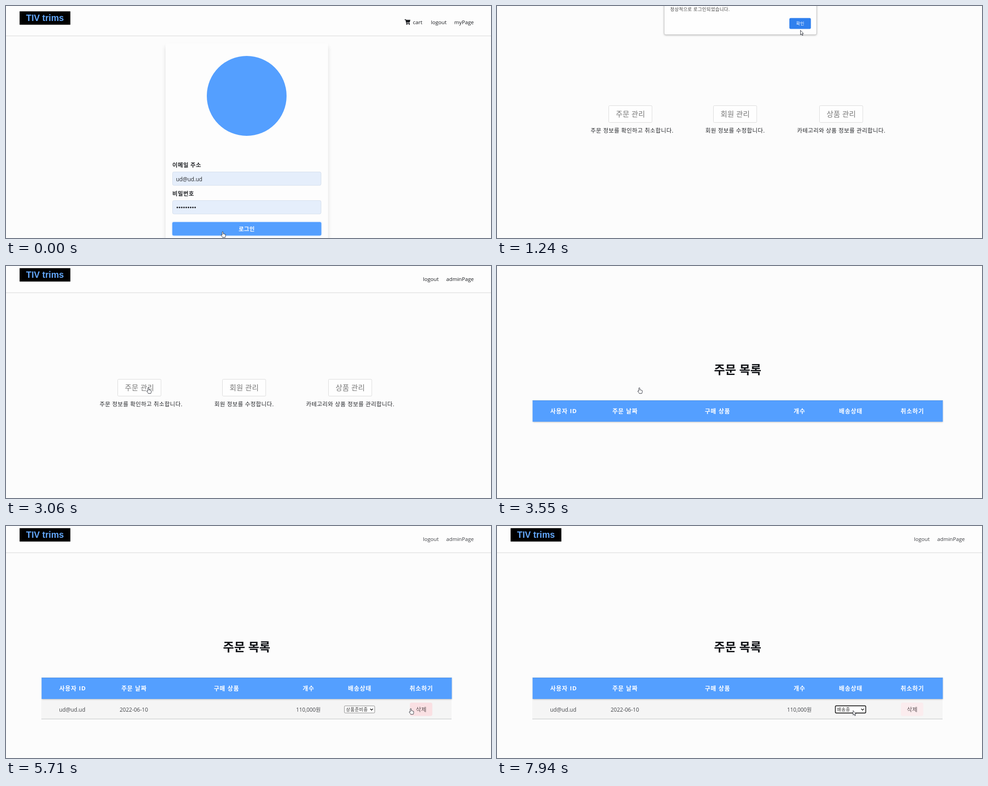
An HTML page with a canvas for the animation above (8 s loop, 1070 px wide and 511 px high).

```html
<!DOCTYPE html>
<html lang="ko">
<head>
<meta charset="utf-8">
<title>Shop admin</title>
<style>
html, body { margin: 0; width: 100%; height: 100%; overflow: hidden; background: #fcfcfc; }
canvas { display: block; width: 1070px; height: 511px; }
</style>
</head>
<body>
<canvas id="stage"></canvas>
<script>
const W = 1070, H = 511, LOOP = 8000, STEP = LOOP / 115;
const BLUE = '#549fff', INK = '#24262a';
const FONT = '"Open Sans", "Noto Sans CJK KR", "Noto Sans CJK", sans-serif';
const MAIL = 'ud@ud.ud';

// moments of the hard changes, ms
const ALERT_IN = 610, ADMIN = 950, ALERT_OUT = 1440, ADMIN_READY = 1540;
const ORDERS = 3470, ORDERS_READY = 3750, MENU_IN = 6400, MENU_OUT = 7300;

// cursor stops: time, x, y
const PATH = [
  [0, 478, 497], [250, 478, 497], [950, 655, 80], [1150, 669, 53],
  [1260, 669, 53], [1360, 668, 42], [1520, 668, 42], [2150, 345, 322],
  [2330, 330, 335], [2380, 330, 335], [2500, 328, 325], [3050, 314, 268],
  [3620, 314, 268], [4280, 290, 379], [4450, 290, 379], [4950, 760, 422],
  [5450, 893, 402], [5780, 893, 402], [6300, 788, 404], [6600, 788, 404],
  [7100, 786, 445], [7600, 786, 445], [7860, 785, 406], [8000, 785, 406]
];

const canvas = document.getElementById('stage');
const dpr = window.devicePixelRatio || 1;
canvas.width = W * dpr;
canvas.height = H * dpr;
const c = canvas.getContext('2d');

function text(str, x, y, size, { color = INK, weight = 400, align = 'center', gap = 0, font = FONT } = {}) {
  c.font = `${weight} ${size}px ${font}`;
  c.letterSpacing = gap + 'px';
  c.textAlign = align;
  c.fillStyle = color;
  c.fillText(str, x, y + size * 0.37);
}

function box(x, y, w, h, { r = 0, fill, line, width = 1, shadow } = {}) {
  c.save();
  c.beginPath();
  c.roundRect(x, y, w, h, r);
  if (shadow) {
    c.shadowColor = shadow[0];
    c.shadowBlur = shadow[1] * dpr;
    c.shadowOffsetY = shadow[2] * dpr;
  }
  if (fill) { c.fillStyle = fill; c.fill(); }
  c.shadowColor = 'transparent';
  if (line) { c.strokeStyle = line; c.lineWidth = width; c.stroke(); }
  c.restore();
}

const inside = (p, x, y, w, h) => p.x >= x && p.x <= x + w && p.y >= y && p.y <= y + h;

function cursorAt(t) {
  let i = 1;
  while (i < PATH.length - 1 && PATH[i][0] < t) i++;
  const [t0, x0, y0] = PATH[i - 1], [t1, x1, y1] = PATH[i];
  const k = Math.min(1, (t - t0) / (t1 - t0));
  const e = k * k * (3 - 2 * k);
  return { x: x0 + (x1 - x0) * e, y: y0 + (y1 - y0) * e };
}

function shape(path, x, y) {
  c.save();
  c.translate(x, y);
  const p = new Path2D(path);
  c.fillStyle = '#fff';
  c.fill(p);
  c.strokeStyle = '#30333c';
  c.lineWidth = 1;
  c.lineJoin = 'round';
  c.stroke(p);
  c.restore();
}

const ARROW = 'M0.5 0.5V10.5L2.8 8.4L4.5 12L6 11.3L4.4 7.8H7.2Z';
const HAND = 'M-1.2 8V1.3Q-1.2 0.2 0 0.2T1.2 1.3V5Q2.4 4.2 3 5.3Q4.2 4.7 4.8 5.8' +
  'Q6.4 5.5 6.4 7V9.5Q6.4 11 5.4 12.8H0Q-1 11-3.4 8.4Q-3.6 6.8-2.3 7.1Z';

function cart(x, y) {
  c.fillStyle = '#15171b';
  c.strokeStyle = '#15171b';
  c.lineWidth = 1.4;
  c.stroke(new Path2D(`M${x} ${y + 1}h2.3l1.9 7.8h6.8`));
  c.fill(new Path2D(`M${x + 2.6} ${y + 1.5}h10l-1.4 5.5h-7.4z`));
  for (const dx of [5, 10]) {
    c.beginPath();
    c.arc(x + dx, y + 11, 1.4, 0, 7);
    c.fill();
  }
}

function header(dy, links, color = '#16181c') {
  box(0, 0, W, 58.5 + dy, { fill: '#fdfdfd' });
  box(0, 58 + dy, W, 1.6, { fill: '#e2e2e2' });
  box(30, 4.8 + dy, 112, 29.4, { fill: '#000' });
  text('TIV trims', 86, 19 + dy, 19.5, { color: '#64a8fb', weight: 700, font: '"Liberation Sans", Arial, sans-serif' });
  for (const [label, right] of links) {
    text(label, right, 29 + dy, 11.6, { align: 'right', color });
  }
}

const ADMIN_LINKS = [['logout', 954.5], ['adminPage', 1032]];

function login() {
  header(7, [['cart', 918.5], ['logout', 972], ['myPage', 1032]]);
  cart(879.5, 29);
  box(352, 82, 358.5, 480, { r: 3, fill: '#fdfdfd', shadow: ['rgba(0,0,0,.13)', 10, 7] });
  c.fillStyle = BLUE;
  c.beginPath();
  c.arc(531, 198, 88, 0, 7);
  c.fill();
  const label = { weight: 700, align: 'left', gap: 0.5 };
  text('이메일 주소', 367, 350, 12.5, label);
  text('비밀번호', 367, 413, 12.5, label);
  for (const y of [365.5, 428.5]) {
    box(367.5, y, 327.5, 29.5, { r: 3, fill: '#e5eefb', line: '#d3deec' });
  }
  text(MAIL, 375, 381.5, 12, { align: 'left' });
  c.fillStyle = '#1d1f24';
  for (let i = 0; i < 9; i++) {
    c.beginPath();
    c.arc(378 + i * 4.9, 443.7, 1.7, 0, 7);
    c.fill();
  }
  box(367, 476, 328.5, 29.5, { r: 3, fill: BLUE, shadow: ['rgba(84,159,255,.7)', 3, 0] });
  text('로그인', 531, 491, 12.5, { color: '#fff', weight: 700, gap: 0.4 });
}

const CARDS = [
  [294, '주문 관리', '주문 정보를 확인하고 취소합니다.', 298],
  [525, '회원 관리', '회원 정보를 수정합니다.', 525.5],
  [759, '상품 관리', '카테고리와 상품 정보를 관리합니다.', 759.5]
];

function admin(ready) {
  const y = ready ? 249.5 : 219.5;
  if (ready) header(0, ADMIN_LINKS);
  for (const [x, title, note, nx] of CARDS) {
    box(x - 47.5, y, 95.5, 37, { r: 2, fill: '#fefefe', line: '#dadada' });
    text(title, x + 0.5, y + 19, 16, { color: '#777', gap: 0.3 });
    text(note, nx, y + 55, 12.5, { gap: 0.5 });
  }
}

function alertBox() {
  box(369, -40, 336, 103, { r: 3, fill: '#fefefe', line: '#d0d0d0', shadow: ['rgba(0,0,0,.35)', 4, 1] });
  text('정상적으로 로그인되었습니다.', 382, 7, 10, { align: 'left', gap: 0.45, color: '#444' });
  box(645, 26.5, 47.5, 24, { r: 3, fill: '#3080ee' });
  text('확인', 669, 38, 9.5, { color: '#fff', gap: 0.3 });
}

const COLUMNS = [
  [146.5, '사용자 ID'], [282, '주문 날짜'], [486, '구매 상품'],
  [667, '개수'], [780, '배송상태'], [916, '취소하기']
];
const STATES = ['상품준비중', '배송중', '배송완료'];

function orderRow(t, p) {
  const open = t >= MENU_IN && t < MENU_OUT;
  if (open || inside(p, 78, 382, 905, 43)) box(78, 381, 905, 44, { fill: '#f5f5f5' });
  box(78, 424.5, 905, 1.3, { fill: '#c9cbcd' });
  const cell = { color: '#45474b' };
  text(MAIL, 146, 404.5, 12, cell);
  text('2022-06-10', 282, 404.5, 12, cell);
  text('110,000원', 667, 404.5, 11.8, cell);

  const focus = t >= MENU_IN;
  box(746.5, 396.2, 67, 15.6, { r: 2, fill: '#fff', line: focus ? '#181818' : '#858585', width: focus ? 1.7 : 1 });
  text(STATES[t < MENU_OUT ? 0 : 1], 750, 404, 10, { align: 'left', gap: 0.5, color: '#333' });
  c.strokeStyle = '#222';
  c.lineWidth = 1.6;
  c.stroke(new Path2D('M803.5 402.5l3 3l3-3'));

  const over = inside(p, 891, 389, 49, 30);
  box(891, 389, 49.5, 29.5, { r: 4, fill: over ? '#fae0e3' : '#fbecee' });
  text('삭제', 916, 404, 12.5, { color: '#5a4d50', gap: 0.3 });
}

function menu(p) {
  const active = Math.max(0, Math.min(2, Math.floor((p.y - 413) / 20)));
  box(746.5, 412.5, 67, 61, { fill: '#fff', line: '#888' });
  STATES.forEach((state, i) => {
    const y = 413 + i * 20;
    if (i === active) box(747, y, 66, 20, { fill: '#1967d2' });
    text(state, 750, y + 10, 10, { align: 'left', gap: 0.5, color: i === active ? '#fff' : '#333' });
  });
}

function orders(t, p) {
  const ready = t >= ORDERS_READY;
  const y = ready ? 334 : 296;
  if (ready) header(0, ADMIN_LINKS, '#3a3c40');
  text('주문 목록', 531, y - 68, 26.5, { weight: 700, color: '#101216' });
  if (ready) orderRow(t, p);
  box(78.5, y, 905, 47, { fill: BLUE, shadow: ['rgba(0,0,0,.25)', 3, 1] });
  box(78.5, y, 905, 1, { fill: '#468de6' });
  for (const [x, label] of COLUMNS) {
    text(label, x + 0.5, y + 23.5, 13, { color: '#fff', weight: 700, gap: 1 });
  }
  if (t >= MENU_IN && t < MENU_OUT) menu(p);
}

function overLink(t, p) {
  if (t < ALERT_IN) return inside(p, 367, 476, 328, 30);
  if (t < ADMIN_READY) return false;
  if (t < ORDERS) return inside(p, 247, 250, 95, 37);
  return t < 3680 || inside(p, 891, 389, 49, 30);
}

function draw(t) {
  const p = cursorAt(t);
  c.setTransform(dpr, 0, 0, dpr, 0, 0);
  box(0, 0, W, H, { fill: '#fcfcfc' });
  if (t < ADMIN) login();
  else if (t < ORDERS) admin(t >= ADMIN_READY);
  else orders(t, p);
  if (t >= ALERT_IN && t < ALERT_OUT) alertBox();
  shape(overLink(t, p) ? HAND : ARROW, p.x, p.y);
}

const start = performance.now();
function tick(now) {
  const t = Math.max(0, now - start) % LOOP;
  draw(Math.floor((t + 15) / STEP) * STEP % LOOP);
  requestAnimationFrame(tick);
}
requestAnimationFrame(tick);
</script>
</body>
</html>
```
